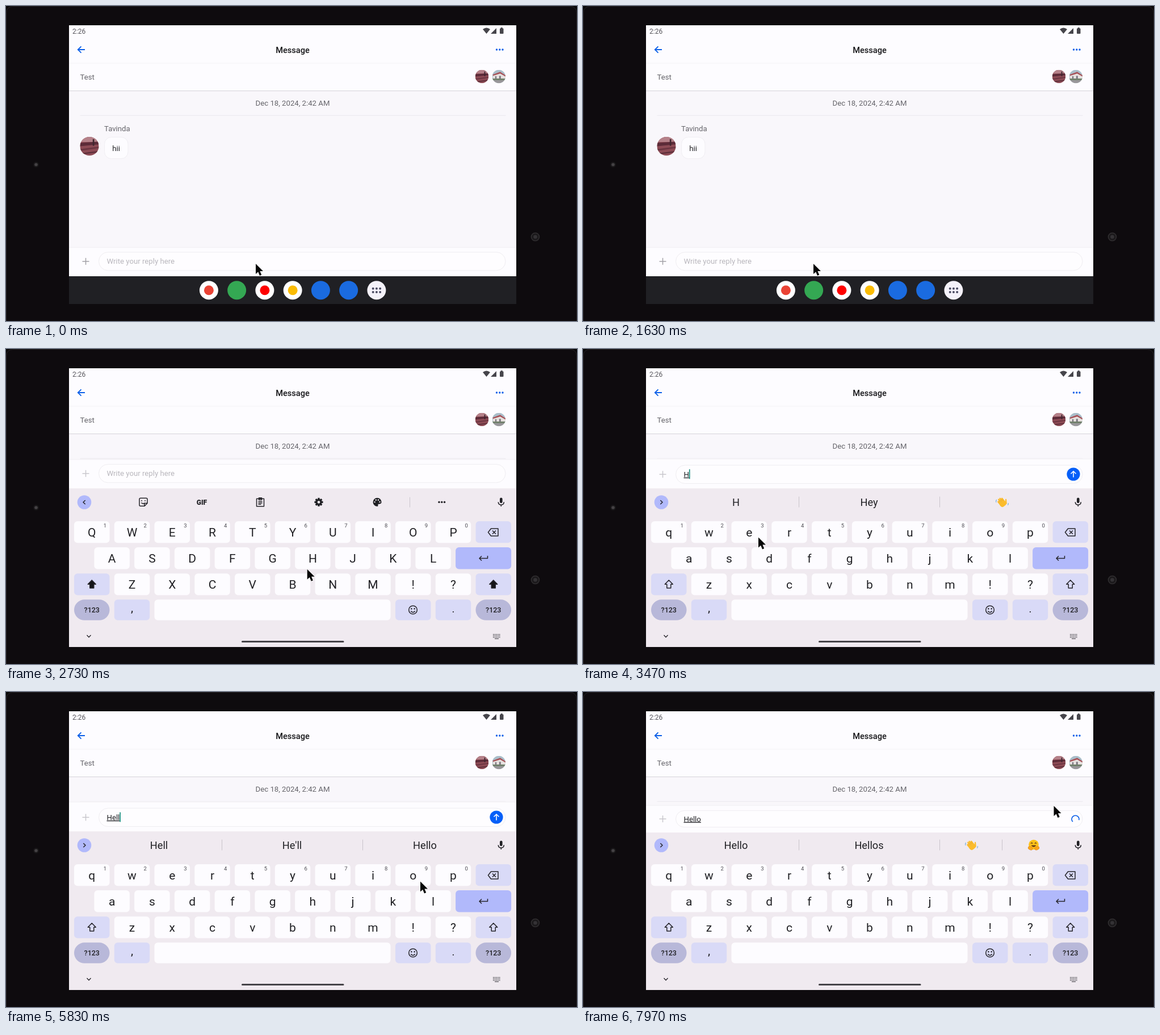
Recreate the animation shown at these times as an HTML page. Size 1006 by 556 pixels, loop 8000 ms.

```html
<!DOCTYPE html>
<html lang="en">
<head>
<meta charset="utf-8">
<title>Message reply</title>
<style>
  html, body { margin: 0; width: 100%; height: 100%; overflow: hidden; background: #0d0b0d; }
  svg { display: block; width: 1006px; height: 556px; font-family: Roboto, sans-serif; }
  text { white-space: pre; }
  .ico { fill: none; stroke: #252429; stroke-width: 1.5; stroke-linejoin: round; }
</style>
</head>
<body>
<svg id="stage" viewBox="0 0 1006 556"></svg>
<script>
const LOOP = 8000;
const INK = '#202024', BLUE = '#0b5fe8', PALE = '#fdfcff', SOFT = '#d9daf7', ACCENT = '#b1b9fb';
const OPEN = 1750, OPEN_END = 2130, SEND = 7050;

// time, typed text, suggestions
const TYPED = [
  [3000, 'H', ['H', 'Hey', '@wave']],
  [3700, 'He', ['He', 'Hey', 'Hello']],
  [5240, 'Hel', ['Hel', 'Help', 'Hello']],
  [5500, 'Hell', ['Hell', "He'll", 'Hello']],
  [6060, 'Hello', ['Hello', 'Hellos', '@wave', '@hug']]
];

// time, pointer x, y
const PATH = [
  [0, 440, 455], [150, 440, 455], [1400, 406, 455], [1630, 406, 455], [2000, 404, 453.5],
  [2300, 404, 453.5], [2850, 548, 380], [3070, 548, 380], [3450, 309, 332.5], [4250, 309, 332.5],
  [5080, 739, 384], [5560, 739, 384], [5800, 730, 334.5], [6300, 730, 334.5],
  [6900, 866, 226], [7200, 866, 226], [7650, 829.5, 201], [8000, 829.5, 201]
];

const rect = (x, y, w, h, fill, r = 0, more = '') =>
  `<rect x="${x}" y="${y}" width="${w}" height="${h}" rx="${r}" fill="${fill}" ${more}/>`;
const dot = (x, y, r, fill, more = '') => `<circle cx="${x}" cy="${y}" r="${r}" fill="${fill}" ${more}/>`;
const label = (x, y, str, size, fill = INK, more = '') =>
  `<text x="${x}" y="${y}" font-size="${size}" fill="${fill}" ${more}>${str}</text>`;
const mid = (x, y, str, size, fill = INK, more = '') =>
  label(x, y, str, size, fill, `text-anchor="middle" ${more}`);
const icon = (x, y, d, more = '') => `<path class="ico" transform="translate(${x} ${y})" d="${d}" ${more}/>`;
const group = (id, body, more = '') => `<g id="${id}" ${more}>${body}</g>`;

const redPhoto = (x, y, r) => `<g transform="translate(${x} ${y}) scale(${r})" clip-path="url(#disc)">
  ${rect(-1, -1, 2, 2, '#8d4b55')}${rect(-1, -1, 2, .55, '#b58189')}
  <path d="M-1 -.35 1 -.5V-.2L-1 0Z" fill="#5c2b38"/><path d="M-1 .3 1 .05V.2L-1 .5Z" fill="#6c3541"/>
  <path d="M-1 .75 1 .5V.62L-1 .9Z" fill="#5a2d38"/>${rect(.35, -.75, .16, .7, '#3f2730')}</g>`;
const housePhoto = (x, y, r) => `<g transform="translate(${x} ${y}) scale(${r})" clip-path="url(#disc)">
  ${rect(-1, -1, 2, 2, '#a9bdc9')}<path d="M-.9 -.2 .2 -.6 1 -.1V.3H-.9Z" fill="#e6e1df"/>
  <path d="M-.9 -.3 .2 -.7 1 -.2V0L.2 -.45-.9 -.1Z" fill="#a85157"/>
  ${rect(-.55, -.05, .2, .35, '#7b7780')}${rect(.05, -.1, .25, .4, '#7b7780')}
  ${rect(-1, .3, 2, .25, '#71806b')}${rect(-1, .55, 2, .5, '#99979a')}</g>`;

const wave = (x, y) => `<g transform="translate(${x} ${y}) rotate(-38)" fill="#fbbc2c">
  ${[-4.6, -1.6, 1.4, 4.2].map((k, i) => rect(k - 1.3, [-6, -8.5, -8.5, -6.5][i], 2.7, 11, '#fbbc2c', 1.3)).join('')}
  ${rect(-6, -1, 11.6, 9, '#fbbc2c', 4)}<path d="M4 5 8-.5Q10-1 9.5 1L5 8Z"/>
  <path d="M-3-1V-5M0-1V-6M2.8-1V-5" stroke="#e29a13" stroke-width=".7"/>
  <path d="M-8-6Q-7-9-4.5-9.5M8 8Q7 10 5 10.5" fill="none" stroke="#72aee0" stroke-width="1.2"/></g>`;
const hug = (x, y) => `<g transform="translate(${x} ${y})">${dot(0, -1, 8.8, '#fcc21b')}
  <path d="M-5-3Q-3.4-5.5-1.8-3M1.8-3Q3.4-5.5 5-3" fill="none" stroke="#653b16" stroke-width="1.3"/>
  <path d="M-4.5 0Q0 6.5 4.5 0Z" fill="#653b16"/>
  <g fill="#fba51b" stroke="#dc861a" stroke-width=".6"><ellipse cx="-5.8" cy="5.2" rx="4.2" ry="2.9" transform="rotate(25 -5.8 5.2)"/>
  <ellipse cx="5.8" cy="5.2" rx="4.2" ry="2.9" transform="rotate(-25 5.8 5.2)"/></g></g>`;
const emoji = { '@wave': wave, '@hug': hug };

function device() {
  return rect(0, 0, 1006, 556, '#080708') + rect(.5, .5, 1005, 575, '#0e0b0e', 11, 'stroke="#252225"') +
    dot(53, 280, 5, '#191719') + dot(53, 280, 2.8, '#444244') +
    dot(932.5, 407.5, 7, '#1b191b', 'stroke="#302e30" stroke-width="1.6"') + dot(932.5, 407.5, 3.3, '#343235');
}

function screen() {
  const grey = '#65646a';
  return rect(111, 34, 788, 492, '#f9f7fb') + rect(111, 34, 788, 115, PALE) +
    label(117, 48.5, '2:26', 12, '#55545a') +
    `<path d="M840 41Q846.500 36 853 41L846.500 49Z M864 39V49H854Z" fill="#46454b"/>` +
    rect(870, 39.500, 6.500, 9.500, '#46454b', 1) + rect(871.700, 38, 3, 2, '#46454b') +
    `<path d="M139 77H127M132.500 71.300 126.700 77 132.500 82.700" fill="none" stroke="${BLUE}" stroke-width="1.800"/>` +
    mid(505, 83, 'Message', 14.6, '#17171a', 'font-weight="500"') +
    [864.5, 869.8, 875].map(x => dot(x, 77, 1.7, BLUE)).join('') +
    rect(111, 100.5, 788, 1, '#f4f3f6') + label(130.5, 129.5, 'Test', 13.2, grey) +
    redPhoto(838.5, 124.5, 11.7) + housePhoto(868.3, 124.5, 11.7) +
    rect(111, 149, 788, 1, '#dfdde2') + rect(111, 150, 788, 1, '#efedf1') +
    mid(505, 176, 'Dec 18, 2024, 2:42 AM', 13.2, grey) + rect(130.5, 192.7, 750, 1, '#eae8ed') +
    label(173, 220.5, 'Tavinda', 13.2, grey) + redPhoto(147, 247.5, 16.6) +
    rect(173.5, 231.500, 41.5, 38, PALE, 12, 'stroke="#f0eef3"') +
    mid(194, 255.7, 'hii', 13.2);
}

// Launcher row: white plates with one plain circle each, or a plain disc.
function dock() {
  const discs = [['#fff', '#ea4335'], ['#34a853'], ['#fff', '#ff0000'], ['#fff', '#fbbc04'], ['#1a6be0'], ['#1a6be0'], ['#f4f1f9']];
  let s = rect(111, 477, 788, 49, '#202024');
  discs.forEach(([base, mark], i) => {
    const x = 357.4 + i * 49.25;
    s += dot(x, 501.700, 16.5, base) + (mark ? dot(x, 501.700, 8.5, mark) : '');
  });
  for (let i = 0; i < 6; i++) s += dot(646.7 + i % 3 * 6.2, 498.7 + (i > 2) * 6.2, 2, '#4b4b62');
  return s;
}

const PITCH = 70.75, KEY_W = 62.5, KEY_H = 38.3;
const rowY = r => 304 + r * 46.1;
const colX = c => 120 + c * PITCH;
const key = (c, r, fill = PALE, w = KEY_W, round = 6) => rect(colX(c), rowY(r), w, r === 3 ? 36.5 : KEY_H, fill, round);
const center = c => colX(c) + KEY_W / 2;

function letters(upper) {
  const put = (row, r, start) => [...row].map((ch, i) =>
    mid(center(start + i), rowY(r) + 26.5, upper ? ch.toUpperCase() : ch, 21)).join('');
  const shift = c => icon(center(c), 415.5, 'M0-7.500 7-.3H3.500V6.500H-3.500V-.3H-7Z', upper ? 'style="fill:#151518"' : '');
  return put('qwertyuiop', 0, 0) + put('asdfghjkl', 1, .5) + put('zxcvbnm!?', 2, 1) + shift(0) + shift(10);
}

function keyboard() {
  let s = rect(111, 246, 788, 290, '#f0eaf0');
  for (let c = 0; c < 10; c++)
    s += key(c, 0) + mid(colX(c) + 54.5, 314.500, (c + 1) % 10, 9.5, '#4b4a50');
  for (let c = 0; c < 9; c++) s += key(c + .5, 1) + key(c + 1, 2);
  s += key(10, 0, SOFT) + key(9.5, 1, ACCENT, 98) + key(0, 2, SOFT) + key(10, 2, SOFT) +
    key(0, 3, '#b8b8d9', KEY_W, 18.3) + key(1, 3, SOFT) + key(2, 3, PALE, 416) +
    key(8, 3, SOFT) + key(9, 3, SOFT) + key(10, 3, '#b8b8d9', KEY_W, 18.3);
  s += [0, 10].map(c => mid(center(c), 465.3, '?123', 12.5, INK, 'font-weight="500"')).join('') +
    mid(center(1), 464, ',', 21) + mid(center(9), 465, '.', 19) +
    icon(858.500, 323.5, 'M-9 0-4-6.500H8.500V6.500H-4ZM-1.500-3 4.500 3M4.500-3-1.500 3') +
    icon(841, 369.5, 'M7.500-4.500V0H-7M-3-4-7 0-3 4') +
    dot(717, 460.500, 7.3, 'none', 'class="ico"') + dot(714.300, 458.500, 1.2, INK) + dot(719.700, 458.500, 1.2, INK) +
    icon(717, 462, 'M-3.700.500Q0 5 3.700.500') +
    icon(146, 507, 'M-3.500-2 0 1.700 3.500-2', 'style="stroke-width:1.300"');
  for (let i = 0; i < 15; i++) s += rect(858 + i % 5 * 2.7, 503 + (i / 5 | 0) * 2.6, 1.6, 1.5, '#55545a');
  s += rect(861, 510.800, 7, 1.2, '#55545a') + `<rect id="handle" x="415" y="515" width="180.500" height="3" rx="1.500"/>`;
  s += dot(138, 270.500, 12.3, ACCENT) + `<path id="toggle" class="ico"/>` +
    rect(870, 262.500, 4.600, 9.500, INK, 2.3) + icon(872.300, 270, 'M-5 0Q-5 5 0 5T5 0M0 5V8');
  return s + group('upper', letters(true)) + group('lower', letters(false)) + group('tools', tools()) + group('hints', '');
}

function tools() {
  const y = 270.3;
  let gear = '';
  for (let a = 0; a < 360; a += 45) gear += rect(-1.7, -7.500, 3.4, 4, INK, .6, `transform="rotate(${a})"`);
  return icon(242, y, 'M-7-5Q-7-7-5-7H5Q7-7 7-5V2L2 7H-5Q-7 7-7 5ZM7 2H2V7M-3.500 1Q-1 4 2 1.500M-3-3.500V-1.500M3-3.500V-1.500') +
    mid(345, y + 4.2, 'GIF', 12, INK, 'font-weight="900"') +
    icon(448, y, 'M-6.500-6H6.500V7.500H-6.500ZM-2.500-7.500H2.500V-4H-2.500ZM-3.500-1H3.500M-3.500 1.500H3.500M-3.500 4H1.500') +
    `<g transform="translate(551 ${y})">${gear}${dot(0, 0, 4, 'none', `stroke="${INK}" stroke-width="3.200"`)}</g>` +
    `<path transform="translate(654 ${y})" d="M0-7.500A7.500 7.500 0 1 0 0 7.500C2.500 7.500 1 5 1.500 4 2 2.500 7.500 4.500 7.500 0 7.500-4.500 4-7.500 0-7.500Z" fill="${INK}"/>` +
    [[-4.4, -.2], [-2.2, -3.8], [2, -3.8], [4.5, -.4]].map(([a, b]) => dot(654 + a, y + b, 1.2, '#f0eaf0')).join('') +
    rect(711, 261.500, 1, 18, '#cac5cc') + [763, 767.8, 772.6].map(x => dot(x, y, 1.7, INK)).join('');
}

function hints(words) {
  const four = words.length > 3;
  const xs = four ? [269.5, 504, 684, 794] : [269.5, 504, 738];
  const bars = four ? [380, 628, 738] : [380, 628];
  return bars.map(x => rect(x, 260.500, 1, 19, '#c9c4cb')).join('') +
    words.map((w, i) => emoji[w] ? emoji[w](xs[i], 270.500) : mid(xs[i], 277.3, w, 18.2)).join('');
}

function composer() {
  return `<rect id="panel" x="111" width="788" fill="${PALE}"/><rect id="edge" x="111" width="788" height="1" fill="#efedf1"/>
    <rect id="pill" x="163.500" width="716.500" rx="16.500" fill="#fefdff" stroke="#efedf1"/>
    <path id="plus" d="M-6 0H6M0-6V6" fill="none" stroke-width="1.500"/>
    <text id="words" x="177.500" font-size="13.2"></text><rect id="caret" width="1.600" height="17" fill="#0d8878"/>` +
    group('send', dot(864, 221, 11.6, '#065ff8') +
      '<path d="M864 226.500V216M859.500 220.300 864 215.800 868.500 220.300" fill="none" stroke="#fff" stroke-width="1.600"/>') +
    `<path id="spin" d="M-4.600 4.600A6.500 6.500 0 1 1 6.300 1.600" fill="none" stroke="${BLUE}" stroke-width="1.500"/>`;
}

const stage = document.getElementById('stage');
stage.innerHTML = `<defs><clipPath id="disc"><circle r="1"/></clipPath>
  <clipPath id="glass"><rect x="111" y="34" width="788" height="492"/></clipPath></defs>` +
  device() + `<g clip-path="url(#glass)">${screen()}${dock()}${group('board', keyboard())}${composer()}</g>` +
  `<path id="arrow" d="M0 0V18L4.200 14.200 7 21 10.200 19.600 7.400 13H13Z" fill="#050505" stroke="#fff" stroke-width="1.300" paint-order="stroke"/>`;

const ui = {};
stage.querySelectorAll('[id]').forEach(el => ui[el.id] = el);
const set = (el, attrs) => { for (const k in attrs) el.setAttribute(k, attrs[k]); };
const show = (el, on) => el.style.display = on ? '' : 'none';
const clamp = v => Math.max(0, Math.min(1, v));

function pointer(t) {
  let i = 1;
  while (i < PATH.length - 1 && PATH[i][0] < t) i++;
  const [t0, x0, y0] = PATH[i - 1], [t1, x1, y1] = PATH[i];
  const u = clamp((t - t0) / (t1 - t0)), e = u * u * (3 - 2 * u);
  return [x0 + (x1 - x0) * e, y0 + (y1 - y0) * e];
}

let shown = '';
function draw(t) {
  const step = TYPED.filter(s => s[0] <= t).pop();
  const open = t >= OPEN, sent = t >= SEND, text = step ? step[1] : '';
  const slide = 281 * (1 - clamp((t - OPEN) / (OPEN_END - OPEN))) ** 3;
  const lift = 1.5 * clamp(1 - (t - OPEN_END) / 100);
  const drop = open ? Math.max(slide, t < 2200 ? lift : 0) : 281;

  show(ui.board, open);
  set(ui.board, { transform: `translate(0 ${drop})` });
  set(ui.handle, { fill: t < 2200 ? '#b1adb3' : '#454348' });
  show(ui.upper, !step);
  show(ui.lower, step);
  show(ui.tools, !step);
  show(ui.hints, step);
  set(ui.toggle, { d: step ? 'M136.300 267 140 270.500 136.300 274' : 'M139.700 267 136 270.500 139.700 274' });
  if (step && shown !== text) ui.hints.innerHTML = hints(step[2]);
  shown = text;

  const bottom = sent ? 248 : Math.min(477, 246 + drop);
  const top = sent ? 199.500 : step ? 193.500 : bottom - 51.5;
  const cy = sent ? 224 : step ? 221.3 : bottom - 26.3;
  const half = sent ? 14.6 : 16.2;
  set(ui.panel, { y: top, height: bottom - top });
  set(ui.edge, { y: top });
  set(ui.pill, { y: cy - half, height: half * 2, rx: half });
  set(ui.plus, { transform: `translate(140.500 ${cy})`, stroke: open ? '#c9c7cd' : '#a3a1a7' });
  ui.words.textContent = text || 'Write your reply here';
  set(ui.words, { y: cy + 4.5, fill: text ? INK : '#b9b7bd', 'text-decoration': text ? 'underline' : 'none' });

  const since = t - (step ? step[0] : OPEN);
  show(ui.caret, open && !sent && since % 1000 < 500);
  set(ui.caret, { x: 177.500 + (text ? ui.words.getComputedTextLength() : 0), y: cy - 9 });
  show(ui.send, step && !sent);
  show(ui.spin, sent);
  set(ui.spin, { transform: `translate(867.500 224.500) rotate(${(t - 7970) * .36})` });
  set(ui.arrow, { transform: `translate(${pointer(t)})` });
}

function tick() {
  draw(performance.now() % LOOP);
  requestAnimationFrame(tick);
}
tick();
</script>
</body>
</html>
```
